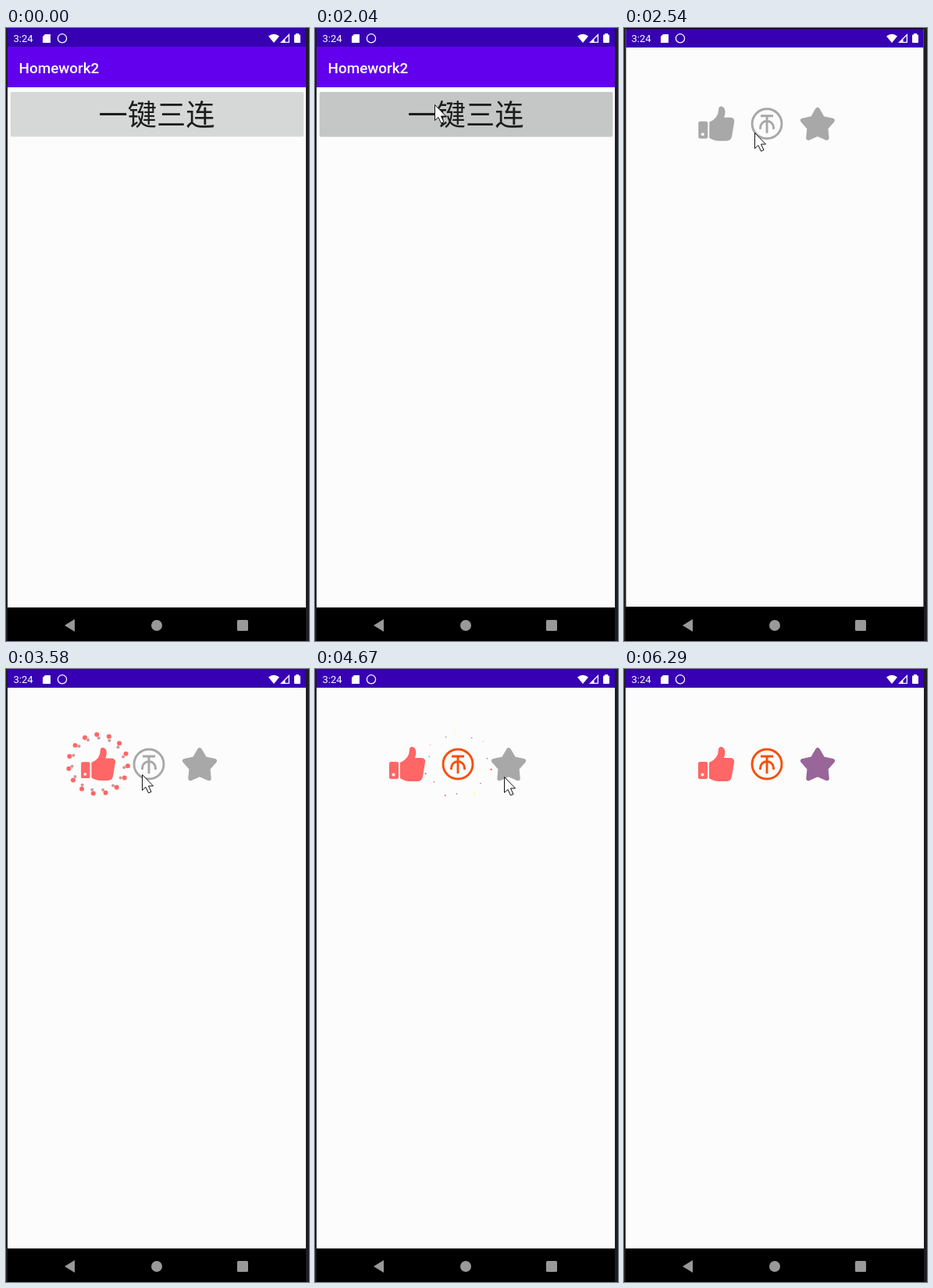
These frames come from a looping animation (388x786 px, 7000 ms). An HTML page with a canvas:

```html
<!DOCTYPE html>
<html lang="zh">
<head>
<meta charset="utf-8">
<style>
html, body { margin: 0; width: 100%; height: 100%; overflow: hidden; background: #1e1e22; }
canvas { display: block; }
</style>
</head>
<body>
<canvas id="stage" width="388" height="786"></canvas>
<script>
const ctx = document.getElementById('stage').getContext('2d');
const LOOP = 7000, OPEN = 2280, PRESS = 1960;
const PAPER = '#fcfcfc', GRAY = '#a8a8a8', STATUS = '#3700b3', BUTTON = 46;
const SPARKS = ['#f44336', '#ffff66', '#ff6666', '#996699', '#ffcccc', '#ffff99', '#ffcccc'];

const thumb = new Path2D('M109 120Q121 115 121 103C121 99 127 98 129 104Q130 108 128 114L137 114Q142 115 141 120L138 138Q137 144 131 144L121 144Q115 144 109 140Z' +
  'M97 119H105Q107 119 107 121V139Q107 141 105 141H97Q95 141 95 139V121Q95 119 97 119Z');
const coin = new Path2D('M202 122A19 19 0 1 1 164 122A19 19 0 1 1 202 122M175 112H191M183 112V134M174.5 129V127A8.5 8.5 0 0 1 191.5 127V129');
const arrow = new Path2D('M0 0V20L4.5 16L8 23.5L11.5 22L8 14.5H14Z');
const star = new Path2D();
for (let i = 0; i < 10; i++) {
  const a = i * Math.PI / 5 - Math.PI / 2, r = i % 2 ? 11 : 20;
  star.lineTo(248 + r * Math.cos(a), 124 + r * Math.sin(a));
}
star.closePath();

const icons = [
  { x: 118, click: 3155, color: '#ff6666', count: 15, turn: 10, big: () => '#ff6666', small: '#cc9999', ring: '#ff6666', draw: drawThumb },
  { x: 183, click: 3955, color: '#f54f0c', count: 7, turn: 20, big: i => SPARKS[i], small: '#666', ring: '#ffcccc', draw: drawCoin },
  { x: 248, click: 4675, color: '#996699', count: 7, turn: 20, big: i => SPARKS[i], small: '#666', ring: '#ffcccc', draw: drawStar },
];

// Pointer stops: time, x, y
const stops = [
  [60, -16, 128], [560, 34, 147], [980, 34, 147], [1260, 208, 52], [1540, 153, 98], [2080, 153, 98],
  [2540, 167, 134], [2860, 119, 135], [3220, 119, 135], [3560, 174, 135], [4080, 174, 135],
  [4600, 242, 138], [5380, 242, 138], [6080, 390, 200],
];

const clamp = v => Math.min(1, Math.max(0, v));
const quartOut = v => 1 - (1 - clamp(v)) ** 4;
const mix = (a, b, k) => a + (b - a) * k;

function cubic(a, b, c, d, s) {
  const r = 1 - s;
  return a * r * r * r + 3 * b * r * r * s + 3 * c * r * s * s + d * s * s * s;
}

// Two-piece "fast out, extra slow in" curve
function extraSlowIn(x) {
  const [xs, ys] = x < 1 / 6
    ? [[0, .05, .1333, 1 / 6], [0, 0, .06, .4]]
    : [[1 / 6, .2083, .25, 1], [.4, .82, 1, 1]];
  let lo = 0, hi = 1;
  for (let i = 0; i < 20; i++) {
    const mid = (lo + hi) / 2;
    if (cubic(...xs, mid) < x) lo = mid; else hi = mid;
  }
  return cubic(...ys, lo);
}

function rect(color, x, y, w, h, r = 0) {
  ctx.fillStyle = color;
  ctx.beginPath();
  ctx.roundRect(x, y, w, h, r);
  ctx.fill();
}

function disc(color, x, y, r) {
  ctx.fillStyle = color;
  ctx.beginPath();
  ctx.arc(x, y, r, 0, 2 * Math.PI);
  ctx.fill();
}

function poly(color, ...points) {
  ctx.fillStyle = color;
  ctx.beginPath();
  for (let i = 0; i < points.length; i += 2) ctx.lineTo(points[i], points[i + 1]);
  ctx.fill();
}

function text(str, x, y, font, color, align = 'left') {
  ctx.font = font;
  ctx.fillStyle = color;
  ctx.textAlign = align;
  ctx.fillText(str, x, y);
}

function drawThumb(color) {
  ctx.fillStyle = color;
  ctx.fill(thumb);
  disc(PAPER, 100.5, 135.5, 2);
}

function drawCoin(color) {
  ctx.strokeStyle = color;
  ctx.lineWidth = 2.9;
  ctx.stroke(coin);
}

function drawStar(color) {
  ctx.fillStyle = ctx.strokeStyle = color;
  ctx.lineWidth = 6;
  ctx.lineJoin = 'round';
  ctx.fill(star);
  ctx.stroke(star);
}

// Icon bounce: 0.4 -> 1 -> 0.9 -> 1
function bounce(k) {
  const frames = [.4, 1, .9, 1], i = Math.min(2, Math.floor(k * 3));
  return mix(frames[i], frames[i + 1], k * 3 - i);
}

function drawIcon(icon, t) {
  const age = t - icon.click, lit = age >= 180;
  const scale = lit ? bounce(clamp((age - 180) / 500)) : 1;
  ctx.save();
  ctx.translate(icon.x, 122);
  ctx.scale(scale, scale);
  ctx.translate(-icon.x, -122);
  icon.draw(lit ? icon.color : GRAY);
  ctx.restore();
  if (age >= 0 && age < 200) {
    const r = BUTTON * .65 * 1.1 * quartOut(age / 200);
    disc(icon.ring, icon.x, 122, r);
    disc(PAPER, icon.x, 122, Math.max(0, r - 1.4));
  }
  if (age >= 200 && age < 1700) drawSparks(icon, 1 + .5 * quartOut((age - 200) / 1500));
}

function drawSparks(icon, v) {
  const size = BUTTON / 4 * (1.5 - v);
  if (size < .04) return;
  for (let i = 0; i < icon.count; i++) {
    const angle = 360 / icon.count * i + 1 + (v - 1) * icon.turn;
    const dot = (color, deg, dist, r) => disc(color,
      icon.x + dist * Math.cos(deg * Math.PI / 180), 122 + dist * Math.sin(deg * Math.PI / 180), r);
    dot(icon.big(i), angle, BUTTON / 1.5 * v, size);
    dot(icon.small, angle - 20, BUTTON / 1.7 * v, size * 2 / 3);
  }
}

function page() {
  rect(PAPER, 2, 0, 382, 743);
  rect(STATUS, 2, 0, 382, 24);
}

function firstPage(t) {
  const press = clamp((t - PRESS) / 80);
  page();
  rect('#6200ee', 2, 24, 382, 52);
  text('Homework2', 16.5, 57.5, '500 18.9px Roboto, sans-serif', '#fff');
  rect(`rgba(0,0,0,${.05 + .07 * press})`, 5.5, 82, 376, 58, 2);
  rect('#d6d7d7', 6, 82, 375, 57, 2);
  rect(`rgba(0,0,0,${.08 * press})`, 6, 82, 375, 57, 2);
  text('一键三连', 193, 125, '37.2px "Noto Sans CJK SC", "Noto Sans CJK", sans-serif', '#1d1d1d', 'center');
}

function secondPage(t) {
  page();
  for (const icon of icons) drawIcon(icon, t);
}

function layer(alpha, scale, draw, t) {
  if (alpha <= 0) return;
  ctx.save();
  ctx.globalAlpha = alpha;
  ctx.translate(193, 393);
  ctx.scale(scale, scale);
  ctx.translate(-193, -393);
  draw(t);
  ctx.restore();
}

function systemBars() {
  const white = '#fff', nav = '#999';
  text('3:24', 9.5, 18, '13px Roboto, sans-serif', white);
  poly(white, 50, 8, 57, 8, 57, 19, 47, 19, 47, 11);
  ctx.strokeStyle = white;
  ctx.lineWidth = 1.3;
  ctx.beginPath();
  ctx.arc(72, 13.3, 5.6, 0, 2 * Math.PI);
  ctx.stroke();
  ctx.fillStyle = white;
  ctx.beginPath();
  ctx.moveTo(343, 19);
  ctx.lineTo(336, 10.5);
  ctx.quadraticCurveTo(343, 5, 350, 10.5);
  ctx.fill();
  poly(white, 351, 19, 363, 7, 363, 19);
  poly(STATUS, 357.5, 17.7, 357.5, 14.5, 361.7, 10.2, 361.7, 17.7);
  rect(white, 369, 8.5, 8, 10.5, 1);
  rect(white, 371, 7, 4, 2);
  rect('#000', 2, 743, 382, 43);
  poly(nav, 75, 766, 88, 758, 88, 774);
  disc(nav, 193, 766, 7);
  rect(nav, 296, 759, 14, 14, 1.5);
}

function pointer(t) {
  const i = stops.findIndex(s => s[0] > t);
  if (i < 1) return;
  const [t0, x0, y0] = stops[i - 1], [t1, x1, y1] = stops[i];
  const p = (t - t0) / (t1 - t0), k = p * p * (3 - 2 * p);
  ctx.save();
  ctx.translate(mix(x0, x1, k) + .5, mix(y0, y1, k) + .5);
  ctx.fillStyle = '#fff';
  ctx.strokeStyle = '#111';
  ctx.lineWidth = 1;
  ctx.fill(arrow);
  ctx.stroke(arrow);
  ctx.restore();
}

function render(now) {
  const t = now % LOOP, age = t - OPEN;
  rect('#1e1e22', 0, 0, 388, 786);
  ctx.save();
  ctx.beginPath();
  ctx.rect(2, 0, 382, 786);
  ctx.clip();
  rect('#000', 2, 0, 382, 786);
  const k = extraSlowIn(clamp(age / 400));
  layer(1 - clamp((age - 35) / 50), 1 + .15 * k, firstPage, t);
  layer(clamp((age - 50) / 50), .85 + .15 * k, secondPage, t);
  systemBars();
  ctx.restore();
  pointer(t);
}

const start = performance.now();
function tick() {
  render(performance.now() - start);
  requestAnimationFrame(tick);
}
tick();
</script>
</body>
</html>
```
